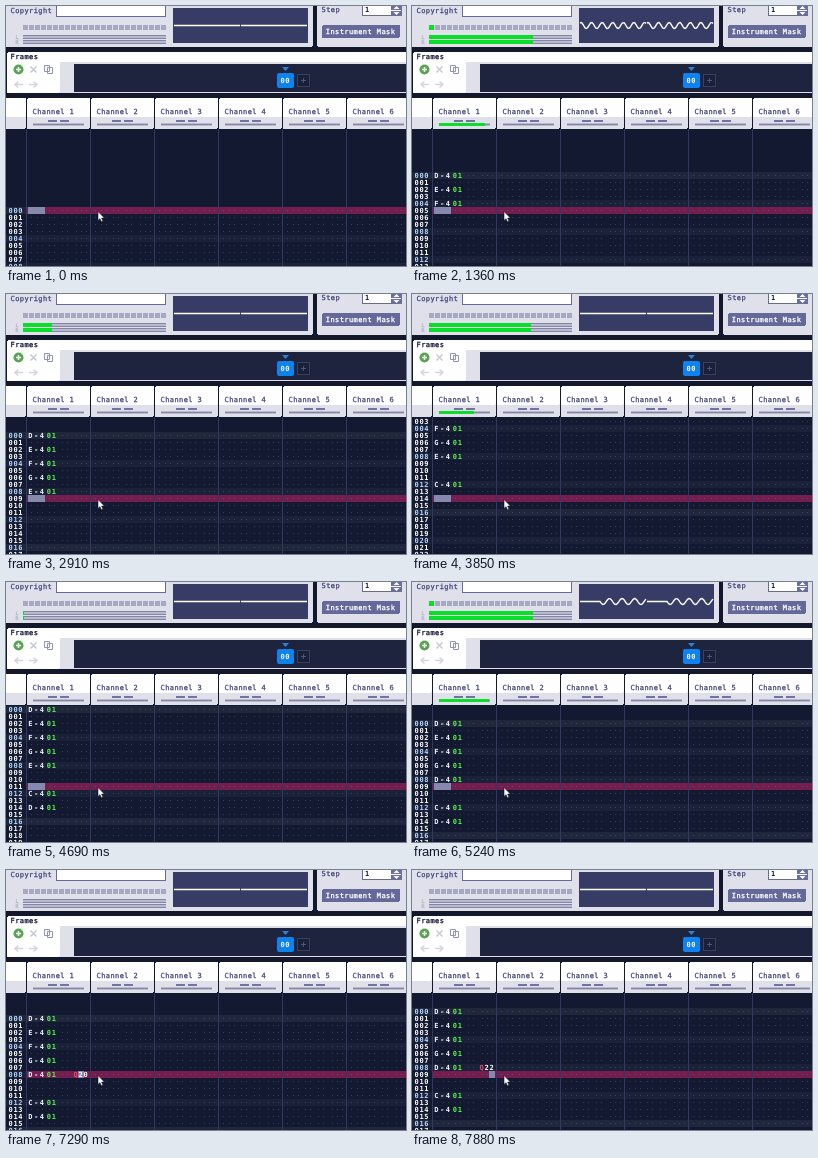
An HTML page for the animation above (8 s loop, 400 px wide and 260 px high).

```html
<!DOCTYPE html>
<html lang="en">
<head>
<meta charset="utf-8">
<title>Tracker</title>
<style>
html, body { margin: 0; width: 100%; height: 100%; overflow: hidden; background: #14182c; }
svg { display: block; width: 400px; height: 260px; }
text { font: 7px "DejaVu Sans Mono", monospace; letter-spacing: .42px; white-space: pre; stroke: currentColor; stroke-width: .3px; }
.cell, .note { font-weight: bold; stroke: none; }
.cell { letter-spacing: .65px; }
.note { letter-spacing: 1.6px; }
</style>
</head>
<body>
<svg id="stage" viewBox="0 0 400 260" shape-rendering="crispEdges">
  <defs>
    <clipPath id="grid"><rect y="123" width="400" height="137"/></clipPath>
    <pattern id="dots" x="21" width="64" height="7" patternUnits="userSpaceOnUse">
      <path d="M4 3.5h1m5 0h1m4 0h1m6 0h1m4 0h1m7 0h1m4 0h1m8 0h1m4 0h1m4 0h1" stroke="#7f86b8" stroke-opacity=".32"/>
    </pattern>
  </defs>
</svg>
<script>
const LOOP = 8000, STEP = 70, ROW = 7, FOCUS = 201, ROWS = 64;
const PANEL = '#dfe0e9', INK = '#484b80', GRAY = '#a6a9c0', DARK = '#8386a8', GREEN = '#0cdc2a';
const stage = document.getElementById('stage');

function add(tag, attrs, parent = stage) {
  const el = document.createElementNS('http://www.w3.org/2000/svg', tag);
  for (const k in attrs) el.setAttribute(k, attrs[k]);
  parent.appendChild(el);
  return el;
}
const rect = (x, y, width, height, fill, parent, more) =>
  add('rect', { x, y, width, height, fill, ...more }, parent);
const path = (d, stroke, more) => add('path', { d, stroke, fill: 'none', ...more });
const smooth = { 'shape-rendering': 'auto' };
function label(x, y, str, fill, parent, cls = '') {
  const el = add('text', { x, y, fill, color: fill, class: cls }, parent);
  el.textContent = str;
  return el;
}

// Time, row and column of the edit cursor
const moves = [
  [0, 0, 0], [590, 1, 0], [800, 2, 0], [940, 3, 0], [1150, 4, 0], [1290, 5, 0],
  [1500, 6, 0], [1640, 7, 0], [1990, 8, 0], [2340, 9, 0], [3050, 10, 0],
  [3120, 11, 0], [3250, 12, 0], [3580, 13, 0], [3780, 14, 0], [3980, 15, 0],
  [4410, 14, 0], [4480, 13, 0], [4550, 12, 0], [4620, 11, 0], [4750, 10, 0],
  [4830, 9, 0], [4970, 8, 0], [5240, 9, 0], [5600, 8, 0], [5730, 8, 1],
  [5800, 8, 2], [5870, 8, 3], [6010, 8, 4], [6140, 8, 5], [6340, 9, 5],
  [6410, 8, 5], [6540, 8, 6], [7090, 9, 6], [7290, 8, 6], [7420, 8, 7], [7750, 9, 7]
];
const columns = [[22, 17], [41, 5], [46, 5], [54, 5], [59, 5], [68, 5], [72, 6], [77, 6]];
// Time, row, pitch, semitones above D
const notes = [
  [590, 0, 'D-4', 0], [940, 2, 'E-4', 2], [1290, 4, 'F-4', 3], [1640, 6, 'G-4', 5],
  [2340, 8, 'E-4', 2], [3580, 12, 'C-4', -2], [3980, 14, 'D-4', 0], [5240, 8, 'D-4', 0]
];
const effects = [[0, ''], [6340, '00'], [7090, '20'], [7750, '22']];
const last = (list, t) => list.filter(e => e[0] <= t).pop();

// Pattern rows
const grid = add('g', { 'clip-path': 'url(#grid)' });
rect(0, 123, 400, 137, '#131930', grid);
const back = add('g', {}, grid);
for (let i = 0; i < ROWS; i += 4) rect(0, i * ROW, 400, ROW, i % 16 ? '#1b2138' : '#20263c', back);
rect(21, FOCUS, 379, ROW, '#741d4f', grid);
const dots = add('g', {}, grid);
rect(21, 0, 379, ROWS * ROW, 'url(#dots)', dots);
const cursor = rect(22, FOCUS, 17, ROW, '#8589ae', grid);
for (let x = 20; x < 400; x += 64) rect(x, 123, 1, 137, '#34385f', grid);
const cells = add('g', {}, grid);
for (let i = 0; i < ROWS; i++)
  label(2.6, i * ROW + 5.9, String(i).padStart(3, '0'), i % 4 ? '#fff' : '#b5d9ff', cells, 'cell');
const shown = notes.map(([, row, name]) => {
  const g = add('g', {}, cells), y = row * ROW + 5.9;
  label(22.2, y, name, '#f1f6ff', g, 'note');
  label(40.8, y, '01', '#5cf04e', g, 'cell');
  return g;
});
const fx = add('g', {}, cells);
label(67.6, 8 * ROW + 5.9, 'Q', '#ef4a70', fx, 'cell');
const digits = label(72.6, 8 * ROW + 5.9, '', '#fff', fx, 'cell');

// Top panels
rect(-4, -4, 311, 45, PANEL, stage, { rx: 3 });
rect(311, -4, 94, 45, PANEL, stage, { rx: 3 });
label(4.5, 7, 'Copyright', INK);
rect(50.5, -4.5, 109, 15, '#fff', stage, { stroke: '#686b99' });
const lamps = [];
for (let i = 0; i < 24; i++) lamps.push(rect(17 + i * 6, 19, 5, 5, GRAY));
const master = [[29, 'L'], [34, 'R']].map(([y, name]) => {
  label(9.5, y + 3.5, name, '#b4b6c8').style.fontSize = '5px';
  rect(17, y, 143, 4, DARK);
  rect(17, y + 1, 143, 2, '#b9bbcd');
  return rect(17, y, 0, 4, GREEN);
});
rect(167, 2, 135, 35, '#363c65');
const scope = path('', '#fff', { 'stroke-width': 1.4, ...smooth });
label(315.5, 6, 'Step', INK);
rect(356.5, -4.5, 39, 14, '#fff', stage, { stroke: '#686b99' });
label(359, 6, '1', '#15183f', stage, 'cell');
rect(385, 0, 11, 4, '#6b6e9d');
rect(385, 5, 11, 5, '#6b6e9d');
path('M387.5 3l3-3 3 3zM387.5 6l3 3 3-3z', 'none', { ...smooth, fill: '#fff' });
rect(316, 19, 78, 13, '#656999', stage, { rx: 2 });
label(319.8, 28, 'Instrument Mask', '#fff');

// Frame list
rect(1, 46, 410, 41, PANEL, stage, { rx: 3 });
rect(1, 46, 410, 10, '#fff', stage, { rx: 2 });
rect(1, 54, 53, 33, '#fff', stage, { rx: 2 });
label(4.5, 53, 'Frames', '#15173f');
rect(68, 58, 332, 28, '#1e243d');
add('circle', { cx: 12.5, cy: 63.5, r: 5, fill: '#55a64f', ...smooth });
path('M10 63.5h5M12.5 61v5', '#fff', { 'stroke-width': 1.4, ...smooth });
path('M24.5 60.5l6 6m0-6l-6 6', '#c9cbd6', { 'stroke-width': 1.6, ...smooth });
path('M38.5 59.5h5v6h-5zM41.5 61.5h5v6h-5z', '#9093b2', { fill: '#fff', ...smooth });
path('M17 78.5H9m3.5-3L9 78.5l3.5 3M23 78.5h8m-3.5-3l3.5 3-3.5 3', '#d4d5df', { 'stroke-width': 1.6, ...smooth });
path('M276 61h7l-3.5 4z', 'none', { fill: '#2c82d4', ...smooth });
rect(271, 67, 17, 15, '#0e82ee', stage, { rx: 2, ...smooth });
label(274.5, 77, '00', '#fff', stage, 'cell');
rect(291.5, 68.5, 12, 12, '#1a2038', stage, { rx: 1, stroke: '#383e66' });
path('M295 74.5h5M297.5 72v5', '#4d5282');

// Channel headers
for (let i = -1; i < 6; i++) {
  const x = 20 + i * 64;
  rect(x + 1, 92, 63, 31, PANEL, stage, { rx: 2 });
  rect(x + 1, 92, 63, 19, '#fff', stage, { rx: 2 });
  if (i < 0) continue;
  label(x + 6.5, 107.7, 'Channel ' + (i + 1), INK);
  rect(x + 22, 114, 9, 2, '#7174a0');
  rect(x + 34, 114, 9, 2, '#7174a0');
  rect(x + 7, 117, 51, 3, '#b9bbcd');
  rect(x + 7, 118, 51, 1, DARK);
}
const level = rect(27, 117, 0, 3, GREEN);
path('M92 205.5v9l2-1.8 1.4 3 1.6-.8-1.4-2.8h2.8z', '#15172c', { fill: '#fff', 'stroke-width': .6, ...smooth });

function wave(age, semis) {
  const period = 12.6 * 2 ** (-semis / 12), start = age < STEP ? 20 : 0;
  let d = '';
  for (const x0 of [168, 235])
    for (let x = 0; x < 67; x++) {
      const on = age < 200 && x >= start;
      const y = on ? 19.5 + 3 * Math.sin((x - start + age * .1) * 2 * Math.PI / period) : 19.5;
      d += (x ? 'L' : 'M') + (x0 + x) + ' ' + y.toFixed(1);
    }
  return d;
}

function draw(t) {
  const [, row, col] = last(moves, t);
  const shift = `translate(0 ${FOCUS - row * ROW})`;
  for (const g of [back, dots, cells]) g.setAttribute('transform', shift);
  cursor.setAttribute('x', columns[col][0]);
  cursor.setAttribute('width', columns[col][1]);

  notes.forEach(([at, r], i) => {
    const replaced = notes.some(([later, r2]) => r2 === r && later > at && later <= t);
    shown[i].style.display = t >= at && !replaced ? '' : 'none';
  });
  const text = last(effects, t)[1];
  fx.style.display = text ? '' : 'none';
  digits.textContent = text;

  const note = last(notes, t);
  const age = note ? Math.floor((t - note[0]) / STEP) * STEP : 1e4;
  const out = Math.max(0, 104 - Math.max(0, age - 200) * .207);
  const vol = Math.max(0, age < 200 ? 50 - age * .06 : 38 - (age - 200) * .27);
  for (const bar of master) bar.setAttribute('width', Math.round(out));
  level.setAttribute('width', Math.round(vol));
  lamps[0].setAttribute('fill', age < 200 ? GREEN : GRAY);
  scope.setAttribute('d', wave(age, note ? note[3] : 0));
}

const begin = performance.now();
function tick() {
  draw((performance.now() - begin) % LOOP);
  requestAnimationFrame(tick);
}
tick();
</script>
</body>
</html>
```
